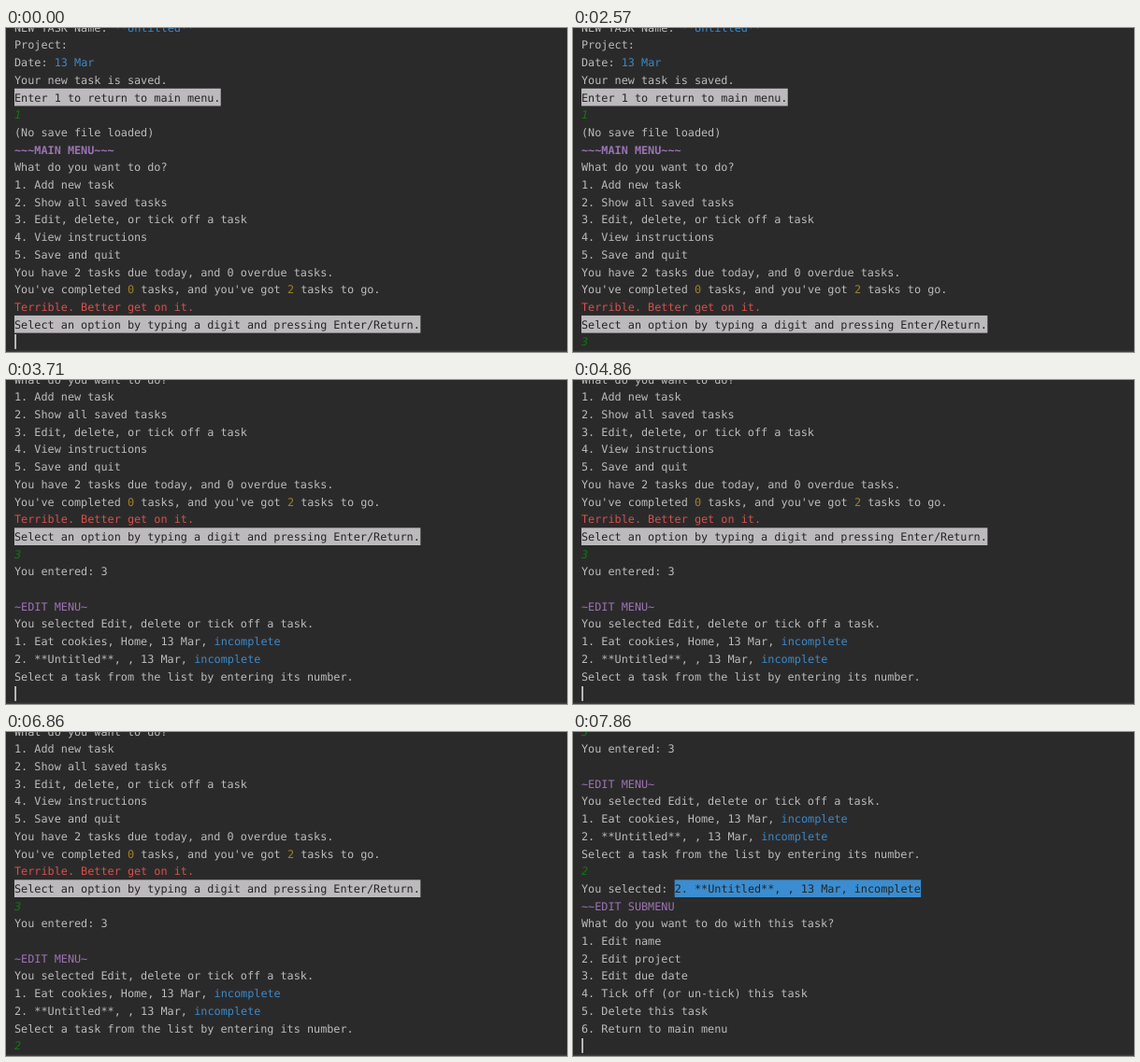
Write an HTML page that moves like this. It is 600 px wide and 347 px high and loops after 8000 ms.

```html
<!DOCTYPE html>
<html lang="en">
<head>
<meta charset="utf-8">
<title>Task list console</title>
<style>
  html, body { margin: 0; width: 100%; height: 100%; overflow: hidden; background: #2b2a2b; }
  svg { display: block; width: 600px; height: 347px; }
  text {
    font: 11.826px "DejaVu Sans Mono", "Noto Sans Mono", monospace;
    text-rendering: geometricPrecision;
    fill: #bbbbbb;
  }
  .purple { fill: #9b74b3; }
  .title { fill: #9b74b3; font-weight: 700; }
  .blue { fill: #3a8ac8; }
  .yellow { fill: #9c8322; }
  .red { fill: #d5514b; }
  .input { fill: #0b7a0b; font-style: italic; }
  .mark, .pick { fill: #252525; }
  .mark-bg { fill: #bcbabc; }
  .pick-bg { fill: #3a8dd0; }
</style>
</head>
<body>
<svg viewBox="0 0 600 347">
  <rect width="600" height="347" fill="#2b2a2b"/>
  <g id="log"></g>
  <rect id="caret" width="1.8" height="15.8" y="328" fill="#c4c4c4"/>
  <rect y="345.6" width="600" height="1.4" fill="#3c3f41"/>
</svg>
<script>
const LEFT = 9, CHAR = 7.12, LINE = 18.7;
const BOTTOM = 326.6;   // top of the lowest row
const BASE = 13.7;      // baseline within a row
const LOOP = 8000, TICK = 1000 / 7, BLINK = 3.5;

// {style|text} colours a part of a line
const lines = [
  "NEW TASK Name: {blue|**Untitled**}",
  "Project:",
  "Date: {blue|13 Mar}",
  "Your new task is saved.",
  "{mark|Enter 1 to return to main menu.}",
  "{input|1}",
  "(No save file loaded)",
  "{title|~~~MAIN MENU~~~}",
  "What do you want to do?",
  "1. Add new task",
  "2. Show all saved tasks",
  "3. Edit, delete, or tick off a task",
  "4. View instructions",
  "5. Save and quit",
  "You have 2 tasks due today, and 0 overdue tasks.",
  "You've completed {yellow|0} tasks, and you've got {yellow|2} tasks to go.",
  "{red|Terrible. Better get on it.}",
  "{mark|Select an option by typing a digit and pressing Enter/Return.}",
  "{input|3}",
  "You entered: 3",
  "",
  "{purple|~EDIT MENU~}",
  "You selected Edit, delete or tick off a task.",
  "1. Eat cookies, Home, 13 Mar, {blue|incomplete}",
  "2. **Untitled**, , 13 Mar, {blue|incomplete}",
  "Select a task from the list by entering its number.",
  "{input|2}",
  "You selected: {pick|2. **Untitled**, , 13 Mar, incomplete}",
  "{purple|~~EDIT SUBMENU}",
  "What do you want to do with this task?",
  "1. Edit name",
  "2. Edit project",
  "3. Edit due date",
  "4. Tick off (or un-tick) this task",
  "5. Delete this task",
  "6. Return to main menu",
  ""
];

// at: tick of the event, shown: lines printed, row: line at the bottom, col: caret column
const steps = [
  { at: -2, shown: 18, row: 18, col: 0 },
  { at: 14, shown: 19, row: 18, col: 1 },
  { at: 21, shown: 19, row: 19, col: 0 },
  { at: 26, shown: 26, row: 26, col: 0 },
  { at: 43, shown: 27, row: 26, col: 1 },
  { at: 50, shown: 27, row: 27, col: 0 },
  { at: 55, shown: 37, row: 36, col: 0 }
];

const log = document.getElementById("log");
const caret = document.getElementById("caret");

function add(parent, tag, attrs) {
  const el = document.createElementNS("http://www.w3.org/2000/svg", tag);
  for (const key in attrs) el.setAttribute(key, attrs[key]);
  return parent.appendChild(el);
}

function drawLine(source, index) {
  const group = add(log, "g", {});
  const top = index * LINE;
  let col = 0;
  for (const part of source.match(/\{[^}]*\}|[^{]+/g) || []) {
    const [, style, inner] = part.match(/^\{(\w+)\|(.*)\}$/) || [null, "", part];
    const x = LEFT + col * CHAR;
    if (style === "mark" || style === "pick") {
      add(group, "rect", { class: style + "-bg", x, y: top, width: inner.length * CHAR, height: LINE });
    }
    const text = add(group, "text", { class: style, x, y: top + BASE });
    text.textContent = inner.replace(/ /g, "\u00a0");
    col += inner.length;
  }
  return group;
}

const rows = lines.map(drawLine);

function render(time) {
  const tick = Math.floor((time % LOOP) / TICK + 0.03);
  const step = steps.filter(s => s.at <= tick).pop();
  rows.forEach((row, i) => row.setAttribute("visibility", i < step.shown ? "visible" : "hidden"));
  log.setAttribute("transform", `translate(0 ${BOTTOM - step.row * LINE})`);
  const lit = Math.floor((tick - step.at) / BLINK) % 2 === 0;
  caret.setAttribute("x", LEFT + 0.2 + step.col * CHAR);
  caret.setAttribute("visibility", lit ? "visible" : "hidden");
}

const start = performance.now();
function loop() {
  render(performance.now() - start);
  requestAnimationFrame(loop);
}
loop();
</script>
</body>
</html>
```
